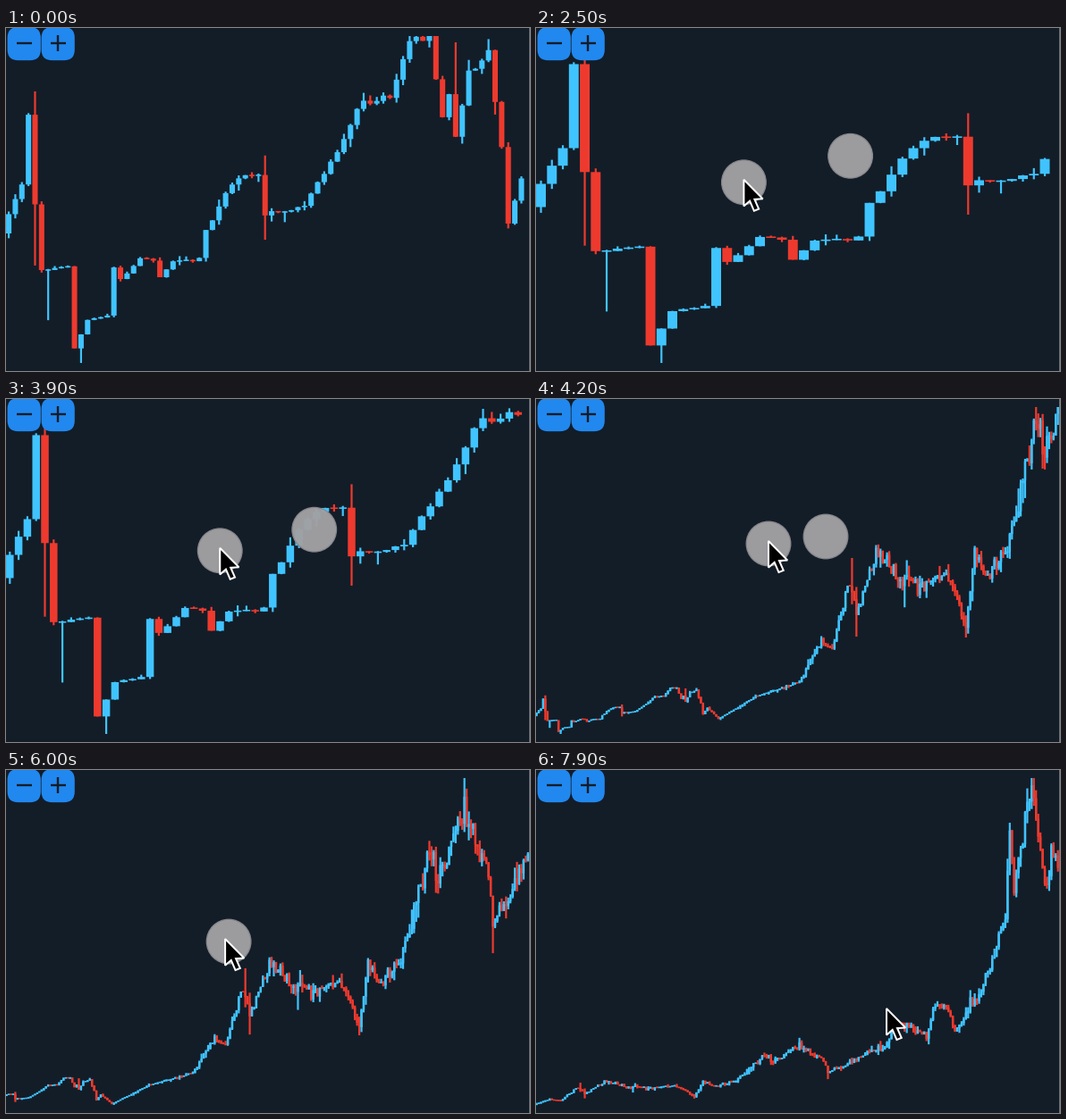
A matplotlib script for the animation above (8000 ms loop, 586 by 384 pixels).

```python
import numpy as np
import matplotlib.pyplot as plt
from matplotlib.animation import FuncAnimation
from matplotlib.collections import PolyCollection
from matplotlib.patches import Circle, FancyBboxPatch, Polygon, Rectangle

W, H, DPI = 586, 384, 100
PX = 72 / DPI
FRAMES, INTERVAL = 80, 100
STEP = 2.45                 # candle spacing at zoom level 1
TOP, BOTTOM = 9, 375        # price range is fitted between these rows
COUNT = 366

BG, UP, DOWN = "#131d28", "#40c4ff", "#ee3a2e"
BUTTON, TOUCH, TOUCH_EDGE = "#2188ef", "#a1a1a4", "#88888c"

# ---------------------------------------------------------------- prices
# Turning points as (candle, price); a seeded random walk fills the gaps.
OPENING = [
    (0, 24), (2, 28.7), (3, 39.6), (4, 25.7), (5, 14.8), (9, 15.2), (10, 2.3),
    (12, 6.8), (15, 7.5), (16, 15.2), (17, 13.2), (20, 16.6), (22, 16.5),
    (23, 13.6), (25, 16.2), (29, 16.5), (30, 21.3), (34, 28.5), (38, 30.5),
    (39, 23.7), (45, 25), (51, 35.6), (53, 40.8), (58, 41.9), (61, 51.5),
    (64, 51.3), (66, 39.2), (67, 42.9), (68, 35.8), (70, 46), (73, 49),
    (75, 34.2), (76, 21.9), (78, 29.5)]
TREND = [
    (83, 17), (100, 42), (120, 58), (130, 105), (135, 94), (143, 175),
    (146, 138), (156, 205), (165, 172), (177, 168), (187, 180), (196, 120),
    (200, 200), (206, 180), (215, 205), (219, 258), (225, 313), (228, 355),
    (232, 318), (244, 404), (255, 325), (257, 258), (264, 290), (274, 358),
    (284, 406), (286, 494), (292, 525), (302, 465), (306, 650), (311, 639),
    (315, 498), (327, 719), (338, 1101), (340, 1680), (342, 1280),
    (350, 1860), (356, 1310), (360, 1520), (363, 1330)]
# Prices touched only by a wick.
SPIKES = [(4, 43.2), (4, 15.5), (6, 6.8), (11, 0), (39, 33), (39, 19.6),
          (61, 52), (68, 51), (144, 197), (146, 109), (196, 108), (228, 366),
          (257, 217), (292, 535), (350, 1910)]


def build_prices():
    rng = np.random.default_rng(8)
    index = np.arange(COUNT)
    calm = index < 122
    ceiling = np.select([index < 79, index < 239, index < 296],
                        [52, 366, 535], 1910)

    close = np.interp(index, *np.array(OPENING + TREND).T)
    close *= 1 + np.where(calm, 0.008, 0.025) * rng.standard_normal(COUNT)
    close = np.minimum(close, ceiling)
    open_ = np.roll(close, 1)
    open_[0] = 20.6

    reach = np.where(calm, 0.015, 0.02) * close
    high = np.maximum(open_, close) + reach * rng.exponential(size=COUNT)
    low = np.minimum(open_, close) - reach * rng.exponential(size=COUNT)
    high = np.minimum(high, ceiling)
    for i, price in SPIKES:
        high[i], low[i] = max(high[i], price), min(low[i], price)
    return open_, close, high, low


OPEN, CLOSE, HIGH, LOW = build_prices()

# ---------------------------------------------------------------- motion
# (seconds, x, y) of the pointer
POINTER = [(1.8, 263, 164), (2.7, 228, 174), (3.7, 228, 174), (4.2, 260, 162),
           (4.8, 260, 162), (5.5, 334, 186), (5.6, 334, 186), (6.3, 194, 196),
           (6.4, 194, 196), (6.8, 362, 219), (6.9, 362, 219), (7.6, 198, 240),
           (7.9, 396, 270)]
ZOOM = [(1.8, 3), (2.7, 5), (3.7, 5), (4.2, 1)]
PAN = [(5.6, 0), (6.3, 57), (6.9, 57), (7.6, 124)]


def glide(keys, t):
    """Ease smoothly from key to key."""
    keys = np.array(keys, float)
    times, values = keys[:, 0], keys[:, 1:]
    if t <= times[0]:
        return values[0]
    if t >= times[-1]:
        return values[-1]
    k = np.searchsorted(times, t, side="right") - 1
    s = (t - times[k]) / (times[k + 1] - times[k])
    s = s * s * (3 - 2 * s)
    return values[k] + (values[k + 1] - values[k]) * s


# ---------------------------------------------------------------- stage
fig = plt.figure(figsize=(W / DPI, H / DPI), dpi=DPI, facecolor=BG)
ax = fig.add_axes([0, 0, 1, 1])
ax.set_xlim(0, W)
ax.set_ylim(H, 0)
ax.axis("off")

candles = PolyCollection([], linewidths=0, zorder=2, snap=False)
ax.add_collection(candles, autolim=False)


def add_button(x, plus):
    size, cy, arm = 37.2, 17, 8.7
    ax.add_patch(FancyBboxPatch(
        (x, -1), size, size, boxstyle="round,pad=0,rounding_size=12",
        facecolor=BUTTON, linewidth=0, zorder=4))
    cx = x + size / 2
    stroke = dict(color=BG, linewidth=2.4 * PX, zorder=5,
                  solid_capstyle="butt")
    ax.plot([cx - arm, cx + arm], [cy, cy], **stroke)
    if plus:
        ax.plot([cx, cx], [cy - arm, cy + arm], **stroke)


add_button(1.6, False)
add_button(39.6, True)
ax.add_patch(Rectangle((W - 1, 0), 1, H, color="#6b7178", linewidth=0,
                       zorder=6))

touches = [ax.add_patch(Circle((0, 0), 24.8, facecolor=TOUCH,
                               edgecolor=TOUCH_EDGE, linewidth=1.3 * PX,
                               alpha=0.97, zorder=7)) for _ in range(2)]
ARROW = 1.06 * np.array([(0, 0), (0, 28), (6.3, 22.5), (10.8, 33), (15.8, 31),
                         (11.3, 20.8), (20, 20.3)])
arrow = ax.add_patch(Polygon(ARROW, facecolor="black", edgecolor="white",
                             linewidth=2 * PX, joinstyle="miter", zorder=8))


def boxes(x, half, top, bottom):
    left, right = x - half, x + half
    return np.stack([np.c_[left, top], np.c_[right, top],
                     np.c_[right, bottom], np.c_[left, bottom]], axis=1)


def draw_chart(level, start):
    gap = STEP * level
    shown = slice(start, start + int(W / gap))
    o, c, h, l = (a[shown] for a in (OPEN, CLOSE, HIGH, LOW))
    low, high = l.min(), h.max()

    def row(price):
        return BOTTOM - (price - low) / (high - low) * (BOTTOM - TOP)

    x = (np.arange(len(o)) + 0.5) * gap - 0.6
    top, bottom = row(np.maximum(o, c)), row(np.minimum(o, c))
    thin = np.maximum(0, 1.6 - (bottom - top)) / 2
    wicks = boxes(x, 1.1, row(h), row(l))
    bodies = boxes(x, max(gap - 1.3, STEP) / 2, top - thin, bottom + thin)
    colors = np.where(c >= o, UP, DOWN)
    candles.set_verts(np.concatenate([wicks, bodies]))
    candles.set_facecolor(list(colors) * 2)


def update(frame):
    t = frame * INTERVAL / 1000
    level = int(round(glide(ZOOM, t)[0]))
    start = int(round(glide(PAN, t)[0]))
    draw_chart(level, start)

    x, y = glide(POINTER, t)
    pinching = 1.4 <= t < 4.85
    dragging = 5.55 <= t < 6.35 or 6.85 <= t < 7.65
    touches[0].set_center((x, y))
    touches[1].set_center((584 - x, 316 - y))
    touches[0].set_visible(pinching or dragging)
    touches[1].set_visible(pinching)
    arrow.set_xy(ARROW + (x - (0 if pinching else 4), y - 3))
    arrow.set_visible(t >= 1.4)
    return [candles, arrow, *touches]


anim = FuncAnimation(fig, update, frames=FRAMES, interval=INTERVAL,
                     repeat=True, repeat_delay=0, blit=False)
plt.show()
```
